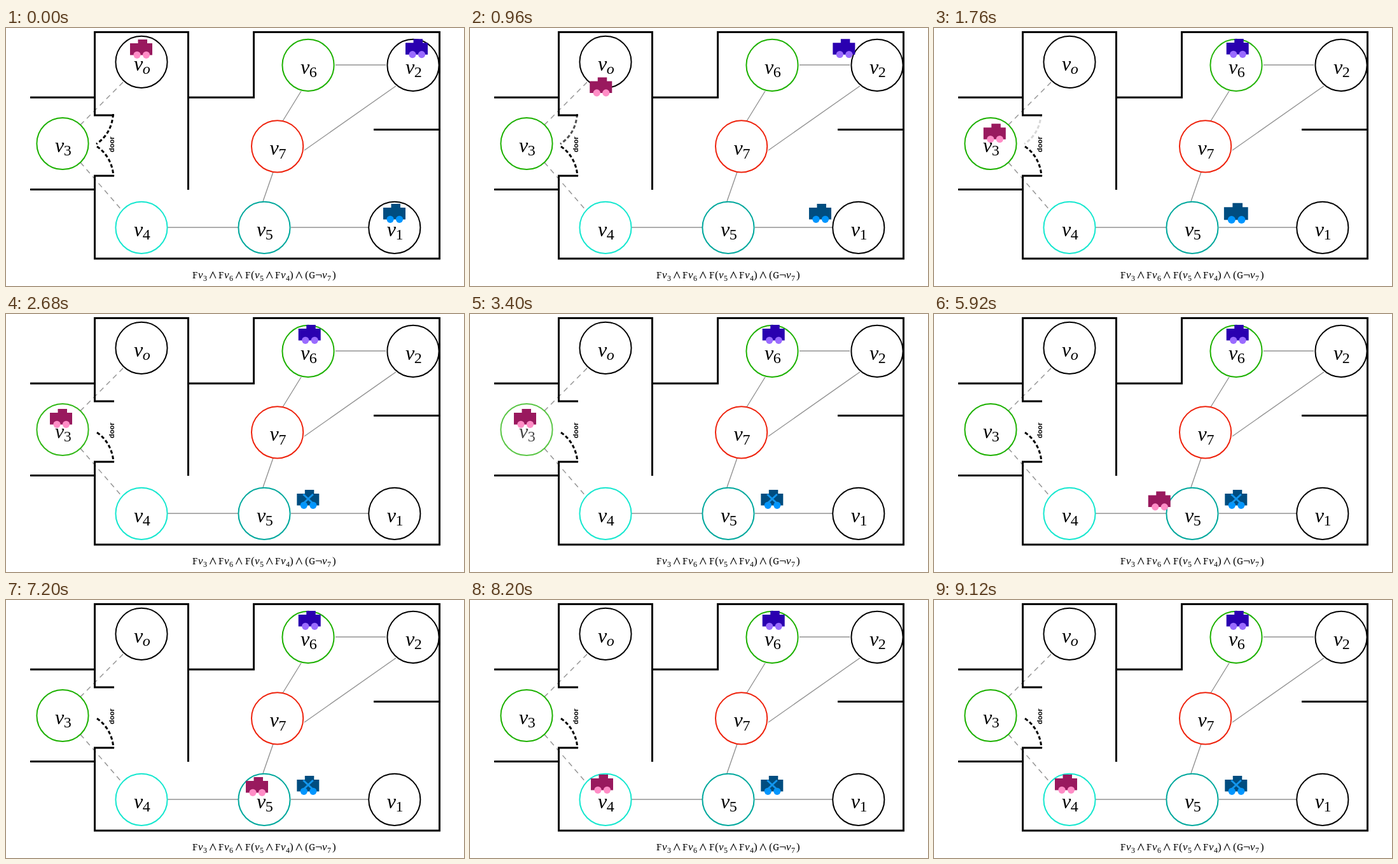
An HTML page that plays this animation: 720 by 405 pixels, repeating every 9640 ms.

```html
<!DOCTYPE html>
<html lang="en">
<head>
<meta charset="utf-8">
<title>Robots on a graph</title>
<style>
  html, body { margin: 0; width: 100%; height: 100%; overflow: hidden; background: #fff; }
  svg { display: block; width: 720px; height: 405px; }
  .line { fill: none; stroke: #000; stroke-width: 3; }
  .edge { fill: none; stroke: #929292; stroke-width: 1.4; }
  .dash { stroke-dasharray: 8 6.5; }
  .door { stroke-dasharray: 5.5 3.5; }
  .serif { font-family: "Liberation Serif", serif; }
  .it { font-style: italic; }
  .slab { font: 14px "Noto Serif", serif; }
  .label { font: bold 11px "Liberation Sans", sans-serif; }
</style>
</head>
<body>
<svg id="stage" viewBox="0 0 720 405"></svg>
<script>
const stage = document.getElementById('stage');
const LOOP = 9640, STEP = 40;

function add(parent, tag, attrs, text) {
  const el = document.createElementNS('http://www.w3.org/2000/svg', tag);
  for (const k in attrs) el.setAttribute(k, attrs[k]);
  if (text) el.textContent = text;
  return parent.appendChild(el);
}
const path = (d, cls) => add(stage, 'path', { d, class: cls });
const write = (parent, x, y, size, cls, text) =>
  add(parent, 'text', { x, y, 'font-size': size, class: cls }, text);

// Graph edges
path('M518 58H597M464 99L435 146M613 91L469 192M420 226L404 272M254 313H366M448 313H570', 'edge');
path('M184 85L117 152', 'edge dash');
path('M117 211L183 287', 'edge dash');

// Walls and door
path('M38 109H139.5M170 137H139.5V6.5H286.5V254M286.5 109H389.5V6.5H681.5V362H139.5V232H170' +
     'M578 159.5H681.5M38 253.5H139.5', 'line');
const upperDoor = path('M168.5 135Q166 166 142 182', 'line door');
path('M143 186Q166 202 169 232', 'line door');
add(stage, 'text', { transform: 'translate(170 195) rotate(-90)', class: 'label' }, 'door');

// Nodes
function node(name, cx, cy, stroke) {
  const g = add(stage, 'g', {});
  add(g, 'circle', { cx, cy, r: 40.6, fill: 'none', stroke, 'stroke-width': 2 });
  write(g, cx - 12, cy + 13.3, 32, 'serif it', 'v');
  write(g, cx + 1.8, cy + 18.8, 24, name === 'o' ? 'serif it' : 'serif', name);
  return g;
}
node('o', 213, 53.3, '#000');
node('2', 640, 58.3, '#000');
node('1', 610.8, 313.3, '#000');
node('7', 426.6, 185.8, '#ee220c');
const v3 = node('3', 89, 181.5, '#1db100');
const v6 = node('6', 475, 58.3, '#1db100');
const v4 = node('4', 213, 313.3, '#16e7cf');
const v5 = node('5', 406, 313.3, '#00a89d');

// Formula
const letters = [['F', 293], ['F', 334], ['F', 376], ['F', 423], ['G', 476]];
const variables = [['3', 302], ['6', 343], ['5', 391], ['4', 432], ['7', 497]];
const brackets = [['(', 385], [')', 446], ['(', 470], [')', 513]];
for (const [s, x] of letters) write(stage, x, 393, 14, 'slab', s);
for (const [s, x] of variables) {
  write(stage, x, 393, 17, 'serif it', 'v');
  write(stage, x + 8, 396.5, 12, 'serif', s);
}
for (const [s, x] of brackets) write(stage, x, 393, 17, 'serif', s);
for (const x of [320.5, 361.5, 409.5, 456])
  add(stage, 'path', { d: `M${x} 393l4.7 -10l4.7 10`, fill: 'none', stroke: '#000', 'stroke-width': 1.1 });
add(stage, 'path', { d: 'M487 387.5h8.5v4', fill: 'none', stroke: '#000', 'stroke-width': 1.1 });

// Robots
function robot(body, wheel) {
  const g = add(stage, 'g', {});
  add(g, 'path', { d: 'M0 6H12.5V0H27V6H35V24.5H0Z', fill: body });
  for (const cx of [11, 25.5]) add(g, 'circle', { cx, cy: 24.3, r: 5.6, fill: wheel });
  return g;
}
const pink = robot('#99195e', '#ff8dc6');
const purple = robot('#2a00b0', '#9a6bff');
const blue = robot('#004d80', '#0096ff');
const cross = add(blue, 'path', { d: 'M10 7L25.5 21.5M25.5 7L10 21.5', stroke: '#1296ee', 'stroke-width': 3 });

function route(start, end, d) {
  const el = document.createElementNS('http://www.w3.org/2000/svg', 'path');
  el.setAttribute('d', d);
  return { start, end, el, length: el.getTotalLength() };
}
const pinkRoutes = [
  route(480, 1930, 'M195 18C190 90 178 150 140 160S90 149 69 149'),
  route(3520, 5020, 'M69 149C100 150 130 165 153 175S178 190 182 197'),
  route(5020, 6220, 'M182 197C188 220 186 262 201 274S300 278 377 278'),
  route(7200, 8200, 'M377 278L190 274')
];
const purpleRoutes = [route(480, 1700, 'M628 17.3L459.7 17')];
const blueRoutes = [route(480, 1520, 'M593 276L457.3 276')];
const blinks = [[v6, 1740, 2640], [v3, 2640, 3520], [v5, 6220, 7200], [v4, 8200, 9120]];

const progress = (t, start, end) => Math.min(1, Math.max(0, (t - start) / (end - start)));
const ease = u => u * u * (3 - 2 * u);

function place(el, routes, t, scale = 1) {
  const r = routes.filter(r => t >= r.start).pop() || routes[0];
  const p = r.el.getPointAtLength(r.length * ease(progress(t, r.start, r.end)));
  el.setAttribute('transform',
    `translate(${p.x} ${p.y}) translate(17.5 15) scale(${scale}) translate(-17.5 -15)`);
}

function draw(now) {
  let t = Math.floor(now % LOOP / STEP) * STEP;
  if (t < 520) t = 0;
  place(pink, pinkRoutes, t);
  place(purple, purpleRoutes, t);
  place(blue, blueRoutes, t, 1 + 0.08 * Math.sin(Math.PI * progress(t, 1520, 2020)));
  cross.setAttribute('opacity', progress(t, 2000, 2400));
  upperDoor.setAttribute('opacity', 1 - progress(t, 480, 2000));
  for (const [el, start, end] of blinks)
    el.setAttribute('opacity', Math.abs(1 - 2 * progress(t, start, end)));
}

const origin = performance.now();
function tick() {
  draw(performance.now() - origin);
  requestAnimationFrame(tick);
}
tick();
</script>
</body>
</html>
```
